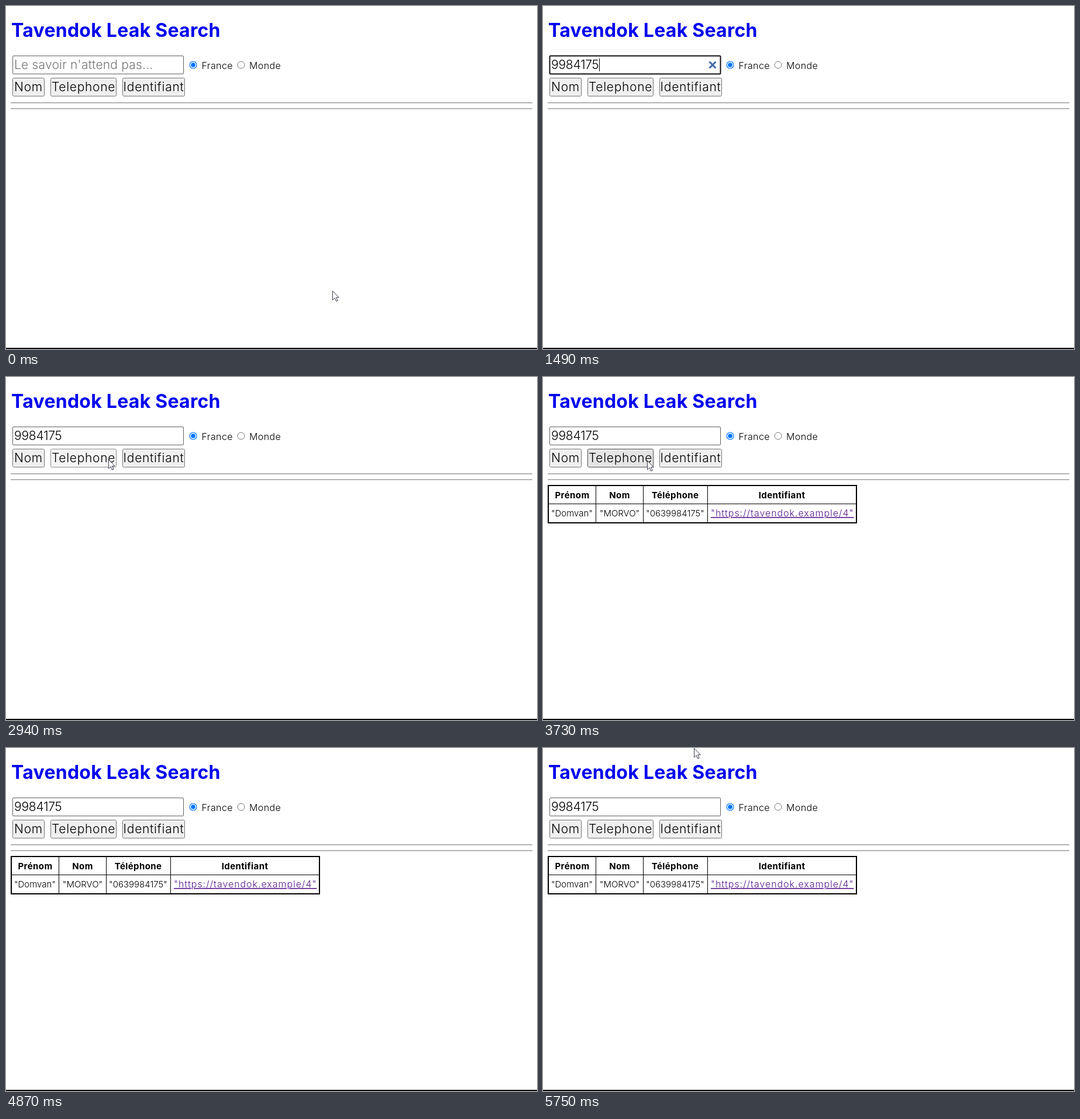
An HTML page that plays this animation: 908 px wide and 588 px high, repeating every 6.65 s.

```html
<!DOCTYPE html>
<html lang="fr">
<head>
<meta charset="utf-8">
<title>Leak Search</title>
<style>
  html, body { margin: 0; width: 100%; height: 100%; overflow: hidden; background: #fff; }
  svg { display: block; }
  text { font: 300 16px Inter, "Open Sans", sans-serif; letter-spacing: .4px; fill: #000; white-space: pre; }
  .title { font-size: 32px; font-weight: 700; letter-spacing: .25px; fill: #00e; }
  .big { font-size: 21px; letter-spacing: .7px; }
  .hint { letter-spacing: .2px; fill: #757575; }
  .digits { letter-spacing: -.2px; }
  .mid, .head text, .row text { text-anchor: middle; }
  .head text { font-size: 15px; font-weight: 700; }
  .row text { font-size: 15px; letter-spacing: 0; }
  .link { fill: #551a8b; letter-spacing: .95px; text-decoration: underline; }
  .box { fill: #efefef; stroke: #767676; }
  .box.hover { fill: #e5e5e5; stroke: #4f4f4f; }
  .box.active { fill: #f5f5f5; stroke: #8d8d8d; }
  #field { fill: #fff; stroke: #606060; }
  #field.focus { stroke: #101010; stroke-width: 2; }
</style>
</head>
<body>
<svg width="908" height="588" viewBox="0 0 908 588">
  <text class="title" x="9" y="53">Tavendok Leak Search</text>

  <rect id="field" x="11.5" y="85.5" width="292" height="31" rx="1.5"/>
  <text id="hint" class="big hint" x="14" y="108">Le savoir n'attend pas...</text>
  <text id="query" class="big digits" x="14" y="108">9984175</text>
  <path id="clear" d="M284.5 95.5l11 11m0-11l-11 11" stroke="#3f68a8" stroke-width="3"/>
  <path id="caret" d="M.5 90v22" stroke="#000"/>

  <circle cx="320" cy="101" r="6" fill="#fff" stroke="#0075ff" stroke-width="1.2"/>
  <circle cx="320" cy="101" r="3.8" fill="#0075ff"/>
  <text x="334.5" y="108">France</text>
  <circle cx="402" cy="101" r="6" fill="#fff" stroke="#767676"/>
  <text x="416" y="108">Monde</text>

  <rect class="box" x="11.5" y="123.5" width="54" height="31" rx="2"/>
  <text class="big mid" x="38.5" y="146">Nom</text>
  <rect id="phone" class="box" x="76.5" y="123.5" width="112" height="31" rx="2"/>
  <text class="big mid" x="132.5" y="146">Telephone</text>
  <rect class="box" x="199.5" y="123.5" width="106" height="31" rx="2"/>
  <text class="big mid" x="252.5" y="146">Identifiant</text>

  <path d="M8 165.5h892m-892 10h892" stroke="#a8a8a8"/>
  <path d="M8 166.5h892m-892 10h892" stroke="#c0c0c0"/>

  <g id="result">
    <rect x="9" y="186" width="527" height="64" fill="#fff" stroke="#000" stroke-width="2"/>
    <path d="M10 217.5h525M90.5 187v62M171.5 187v62M281.5 187v62" stroke="#000"/>
    <g class="head">
      <text x="50" y="208">Prénom</text>
      <text x="131" y="208">Nom</text>
      <text x="226" y="208">Téléphone</text>
      <text x="408.5" y="208">Identifiant</text>
    </g>
    <g class="row">
      <text x="49.5" y="239">"Domvan"</text>
      <text x="131" y="239">"MORVO"</text>
      <text x="226" y="239">"0639984175"</text>
    </g>
    <text class="link" x="287" y="239">"https://tavendok.example/4"</text>
  </g>

  <rect y="586" width="908" height="2"/>
  <path id="pointer" d="M.5.5v15.5l3.7-3.4 2.5 5.6 2.4-1-2.5-5.5h4.6z" fill="#fff" stroke="#23233c" stroke-width=".9"/>
</svg>
<script>
  const LOOP = 6650, TICK = 97;
  const FOCUS = 880, PASTE = 1490, PRESS = 2940, RELEASE = 3210;

  const linear = u => u;
  const easeIn = u => u * u;
  const easeOut = u => 1 - (1 - u) ** 6;

  // Each move starts where the one before it ended.
  const home = { x: 558, y: 488 };
  const moves = [
    { from: 120, to: 580, x: 250, y: 104, ease: linear },
    { from: 2070, to: 2360, x: 175, y: 141, ease: easeOut },
    { from: 3730, to: 4320, x: 300, y: 253, ease: easeIn },
    { from: 4500, to: 5080, x: 340, y: 236, ease: linear },
    { from: 5550, to: 5750, x: 258, y: 0, ease: linear }
  ];

  const $ = id => document.getElementById(id);
  const show = (id, on) => $(id).setAttribute("visibility", on ? "visible" : "hidden");
  const inside = (p, left, top, right, bottom) =>
    p.x >= left && p.x <= right && p.y >= top && p.y <= bottom;

  // The pointer advances in even ticks, as in a screen recording.
  function pointerAt(t) {
    let p = home;
    for (const m of moves) {
      if (t < m.from) break;
      const ticks = Math.round((m.to - m.from) / TICK);
      const done = Math.floor((t - m.from) / (m.to - m.from) * ticks);
      const u = m.ease(Math.min(1, (done + 1) / (ticks + 1)));
      p = {
        x: Math.round(p.x + (m.x - p.x) * u),
        y: Math.round(p.y + (m.y - p.y) * u)
      };
    }
    return p;
  }

  function draw(t) {
    const p = pointerAt(t);
    const focus = t >= FOCUS && t < PRESS;
    const filled = t >= PASTE;
    const found = t >= RELEASE;
    const pressed = t >= PRESS && !found;
    const onPhone = inside(p, 76, 123, 189, 155);
    const onText = inside(p, 11, 85, 304, 117) || found && inside(p, 8, 218, 537, 250);

    $("field").setAttribute("class", focus ? "focus" : "");
    $("phone").setAttribute("class", "box " + (pressed ? "active" : onPhone ? "hover" : ""));
    show("hint", !filled);
    show("query", filled);
    show("clear", filled && focus);
    show("caret", focus);
    const end = filled ? Math.round($("query").getComputedTextLength()) : 0;
    $("caret").setAttribute("transform", `translate(${14 + end})`);
    show("result", found);
    show("pointer", !onText);
    $("pointer").setAttribute("transform", `translate(${p.x} ${p.y})`);
  }

  const start = performance.now();
  function tick() {
    draw((performance.now() - start) % LOOP);
    requestAnimationFrame(tick);
  }
  tick();
</script>
</body>
</html>
```
